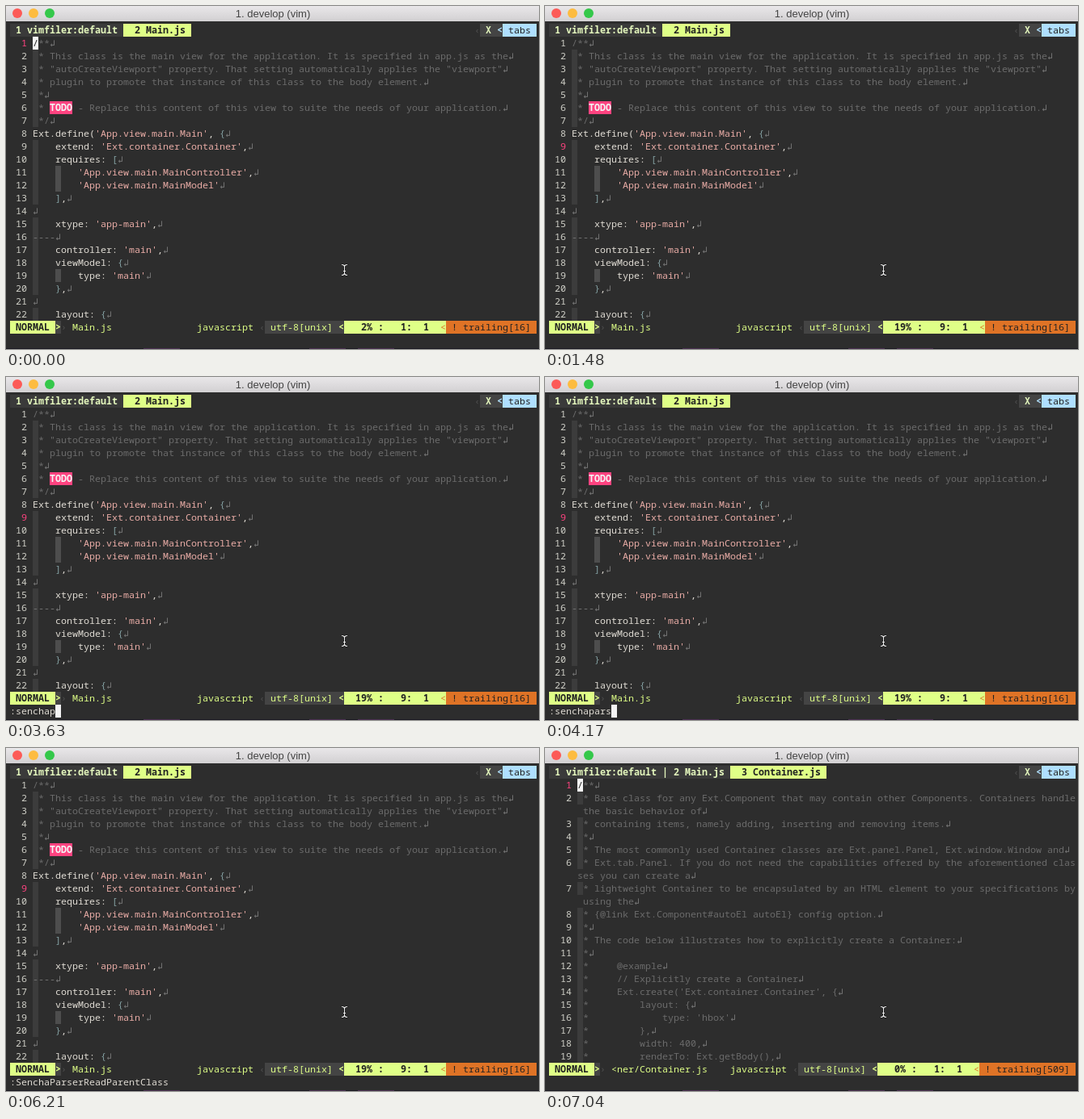
An HTML page with a canvas that plays this animation: 659x425 px, repeating every 8000 ms.

```html
<!DOCTYPE html>
<html lang="en">
<head>
<meta charset="utf-8">
<title>Terminal</title>
<style>
html, body { margin: 0; width: 100%; height: 100%; overflow: hidden; background: #2d2d2d; }
canvas { display: block; }
</style>
</head>
<body>
<canvas id="stage" width="659" height="425"></canvas>
<script>
const ctx = document.getElementById('stage').getContext('2d');
const LOOP = 8000, COLS = 93, CW = 7, CH = 16, LEFT = 5, TOP = 22;
const FONT = '11.667px "Noto Sans Mono", "DejaVu Sans Mono", monospace';
const BG = '#2d2d2d', PANEL = '#444444', TAB = '#3a3a3a', LIME = '#dfff87', BLUE = '#afdfff',
  ORANGE = '#df7326', PINK = '#ff4380', TEXT = '#e0dcd4', COMMENT = '#6b6b6b', STRING = '#e9aca6',
  BRACE = '#84a0a2', EOL = '#777777', INK = '#222222', WHITE = '#f4f4f4', FAINT = '#505050';

const mainFile = `/**
 * This class is the main view for the application. It is specified in app.js as the
 * "autoCreateViewport" property. That setting automatically applies the "viewport"
 * plugin to promote that instance of this class to the body element.
 *
 * TODO - Replace this content of this view to suite the needs of your application.
 */
Ext.define('App.view.main.Main', {
    extend: 'Ext.container.Container',
    requires: [
        'App.view.main.MainController',
        'App.view.main.MainModel'
    ],

    xtype: 'app-main',
----
    controller: 'main',
    viewModel: {
        type: 'main'
    },

    layout: {`.split('\n');

const containerFile = `/**
 * Base class for any Ext.Component that may contain other Components. Containers handle the basic behavior of
 * containing items, namely adding, inserting and removing items.
 *
 * The most commonly used Container classes are Ext.panel.Panel, Ext.window.Window and
 * Ext.tab.Panel. If you do not need the capabilities offered by the aforementioned classes you can create a
 * lightweight Container to be encapsulated by an HTML element to your specifications by using the
 * {@link Ext.Component#autoEl autoEl} config option.
 *
 * The code below illustrates how to explicitly create a Container:
 *
 *     @example
 *     // Explicitly create a Container
 *     Ext.create('Ext.container.Container', {
 *         layout: {
 *             type: 'hbox'
 *         },
 *         width: 400,
 *         renderTo: Ext.getBody(),`.split('\n');

const typed = ':senchaparserre';
const completed = ':SenchaParserReadParentClass';
const message = '"~/Sites/helloworld/ext/src/container/Container.js" 2141L, 77355C';
// [time, value] pairs
const cursorLines = [[0, 1], [240, 2], [480, 3], [540, 5], [590, 7], [770, 8], [1000, 9]];
const keys = [[0, 0], [2320, 1], [2440, 2], [2620, 3], [2850, 4], [2910, 5], [3090, 6], [3210, 7],
  [3630, 8], [3750, 9], [3930, 10], [4170, 11], [4350, 12], [4530, 13], [5370, 15]];

const latest = (steps, t) => steps.findLastIndex(s => s[0] <= t);
const pad = (value, width) => String(value).padStart(width);

function box(x, y, w, h, color) {
  ctx.fillStyle = color;
  ctx.fillRect(x, y, w, h);
}

// Writes text on the character grid and returns the next free column.
function put(col, row, text, fg, bg, bold) {
  const x = LEFT + col * CW, y = TOP + row * CH;
  if (bg) box(x, y, text.length * CW, CH, bg);
  ctx.font = (bold ? 'bold ' : '') + FONT;
  ctx.fillStyle = fg;
  [...text].forEach((ch, i) => ch !== ' ' && ctx.fillText(ch, x + i * CW, y + 12));
  return col + text.length;
}

function drawLine(line, col, row, width) {
  const comment = /^( \*|\/\*)/.test(line);
  const indent = line.match(/^[ -]*/)[0].length;
  for (let i = 0; i < indent; i += 4) put(col + i, row, ' ', TEXT, i ? '#4e4e4e' : '#3c3c3c');
  const tokens = comment ? line.split(/(TODO)/) : line.split(/('[^']*'|[[\]{}]|-+)/);
  let at = 0;
  const write = (text, ...style) => {
    for (const ch of text) {
      put(col + at % width, row + Math.floor(at / width), ch, ...style);
      at++;
    }
  };
  for (const token of tokens) {
    if (token === 'TODO') write(token, WHITE, PINK, true);
    else if (comment) write(token, COMMENT);
    else write(token, token[0] === "'" ? STRING : /^[[\]{}]/.test(token) ? BRACE : token[0] === '-' ? EOL : TEXT);
  }
  write('↲', EOL);
  return Math.ceil(at / width);
}

function drawFile(lines, gutter, current) {
  let row = 1;
  lines.forEach((line, i) => {
    const on = i + 1 === current;
    put(0, row, pad(i + 1, gutter - 1), on ? PINK : '#d0d0c8');
    row += drawLine(line, gutter, row, COLS - gutter);
  });
}

function drawTabs(hidden, active) {
  const col = put(0, 0, hidden, '#e4f7bd', TAB, true);
  put(col, 0, active, INK, LIME, true);
  put(82, 0, '‹', FAINT);
  put(83, 0, ' X ', '#e4f7bd', PANEL, true);
  put(86, 0, '<', BLUE, PANEL, true);
  put(87, 0, ' tabs ', INK, BLUE);
}

function drawStatus(name, line, total, trailing, shift) {
  const row = 23;
  put(0, row, ' NORMAL ', INK, LIME, true);
  put(8, row, '>', LIME, PANEL, true);
  put(9, row, '›', FAINT);
  put(11, row, name, LIME);
  put(33 - shift, row, 'javascript', LIME);
  put(44 - shift, row, '‹', FAINT);
  let col = put(45 - shift, row, ' utf-8[unix] ', LIME, PANEL);
  col = put(col, row, '<', LIME, PANEL, true);
  const percent = Math.floor(100 * line / total);
  col = put(col, row, ` ${pad(percent, 3)}% :${pad(line, 4)}:${pad(1, 3)}  `, INK, LIME, true);
  col = put(col, row, '<', ORANGE, LIME);
  put(col, row, ` ! trailing[${trailing}] `, INK, ORANGE);
}

function drawCommand(t) {
  if (t >= 6860) return put(0, 24, message, TEXT);
  if (t >= 5670) {
    const end = put(0, 24, completed, TEXT);
    return t < 6210 && put(end, 24, ' ', INK, WHITE);
  }
  const k = latest(keys, t);
  if (!k) return;
  const end = put(0, 24, typed.slice(0, keys[k][1]), TEXT);
  // The block is only half lit between two quick keystrokes.
  const quick = keys[k + 1] && keys[k + 1][0] - keys[k][0] < 100;
  put(end, 24, ' ', INK, quick ? '#b0b0b0' : WHITE);
}

function drawWindow() {
  box(0, 0, 659, 425, BG);
  const bar = ctx.createLinearGradient(0, 0, 0, 19);
  bar.addColorStop(0, '#e9e7e9');
  bar.addColorStop(1, '#d2d0d2');
  box(0, 0, 659, 19, bar);
  ['#fc5b57', '#fdbc40', '#34c84a'].forEach((color, i) => {
    ctx.fillStyle = color;
    ctx.beginPath();
    ctx.arc(14 + 20 * i, 9, 6, 0, 7);
    ctx.fill();
  });
  ctx.font = '13px "Liberation Sans", sans-serif';
  ctx.fillStyle = '#444444';
  ctx.textAlign = 'center';
  ctx.fillText('1. develop (vim)', 330, 14);
  ctx.textAlign = 'left';
  box(0, 424, 659, 1, '#1b1a22');
  for (const x of [170, 375, 435]) box(x, 424, 45, 1, '#4a2f52');
}

function drawPointer() {
  const beam = new Path2D('M415 320.5 Q418 320.5 418.5 322.5 Q419 320.5 422 320.5' +
    ' M418.5 322V332 M415 333.5 Q418 333.5 418.5 331.5 Q419 333.5 422 333.5 M417 328.5H420');
  for (const [color, width] of [['#151515', 2.6], ['#eeeeee', 1.1]]) {
    ctx.strokeStyle = color;
    ctx.lineWidth = width;
    ctx.stroke(beam);
  }
}

function draw(t) {
  drawWindow();
  if (t < 7040) {
    const line = cursorLines[latest(cursorLines, t)][1];
    drawTabs(' 1 vimfiler:default ', '  2 Main.js ');
    drawFile(mainFile, 4, line);
    drawStatus('Main.js', line, 47, 16, 0);
    if (t < 1480) put(4, line, mainFile[line - 1][0], INK, WHITE);
    drawCommand(t);
  } else {
    drawTabs(' 1 vimfiler:default | 2 Main.js ', '  3 Container.js ');
    drawFile(containerFile, 5, 1);
    drawStatus('<ner/Container.js', 1, 2141, 509, 1);
    put(5, 1, '/', INK, WHITE);
  }
  drawPointer();
}

function frame() {
  draw(performance.now() % LOOP);
  requestAnimationFrame(frame);
}
frame();
</script>
</body>
</html>
```
